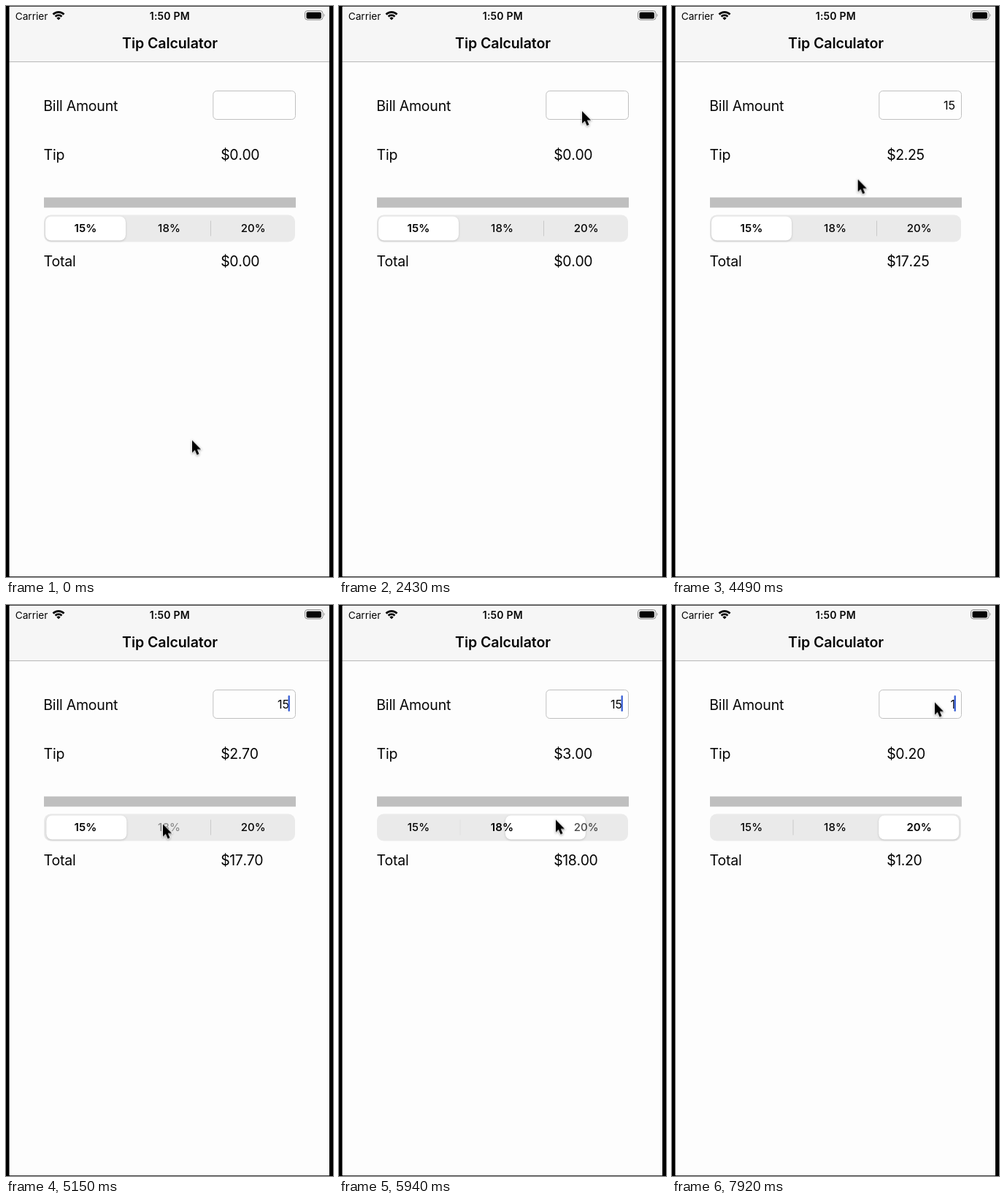
Write an HTML page that moves like this. It is 448x783 px and loops after 8000 ms.

```html
<!DOCTYPE html>
<html lang="en">
<head>
<meta charset="utf-8">
<title>Tip Calculator</title>
<style>
html, body { margin: 0; width: 100%; height: 100%; overflow: hidden; background: #fdfdfd; }
svg { display: block; width: 448px; height: 783px; }
text { font-family: Inter, "Open Sans", sans-serif; fill: #050505; }
.label { font-size: 19.5px; letter-spacing: -.2px; }
.money { font-size: 19.5px; letter-spacing: -.4px; font-kerning: none; }
.title { font-size: 19.6px; font-weight: 600; letter-spacing: -.1px; }
.status { font-size: 13.7px; }
.clock { font-size: 14px; font-weight: 600; letter-spacing: .2px; }
.field { font-size: 16.2px; text-anchor: end; }
.seg { font-size: 15px; font-weight: 500; letter-spacing: .1px; text-anchor: middle; }
.seg.on { font-weight: 600; }
.mid { text-anchor: middle; }
#thumb { filter: drop-shadow(0 1px 1.5px rgba(0, 0, 0, .17)); }
#cursor {
  filter: drop-shadow(0 1.5px 1.5px rgba(0, 0, 0, .35));
  animation: point 8s ease-in-out infinite;
}
@keyframes point {
  0%, 6.24% { transform: translate(255px, 595.5px); }
  6.25%, 11.2% { transform: translate(354.5px, 97px); }
  14.5%, 17% { transform: translate(353.5px, 55px); }
  19.75% { transform: translate(352px, 66.5px); }
  23.1% { transform: translate(334px, 142px); }
  38.2%, 54% { transform: translate(332px, 146.5px); }
  57.6% { transform: translate(214.5px, 285px); }
  61%, 69% { transform: translate(215px, 300.5px); }
  72.5%, 75.9% { transform: translate(297px, 294.5px); }
  81.25% { transform: translate(339px, 140.5px); }
  85.9%, 100% { transform: translate(360px, 133.5px); }
}
</style>
</head>
<body>
<svg viewBox="0 0 448 783">
  <rect width="448" height="783" fill="#fdfdfd"/>
  <rect width="448" height="76" fill="#f6f6f6"/>
  <rect y="76" width="448" height="1" fill="#b8b8b8"/>

  <text class="status" x="12.7" y="18.5">Carrier</text>
  <g fill="none" stroke="#050505" stroke-width="2.7">
    <path d="M64.5 11.5A10.6 10.6 0 0 1 79.5 11.5M67.55 14.55A6.3 6.3 0 0 1 76.45 14.55"/>
    <path d="M72 19.3l-2.6-2.6a3.6 3.6 0 0 1 5.2 0z" fill="#050505" stroke="none"/>
  </g>
  <text class="clock mid" x="224.3" y="18.5">1:50 PM</text>
  <rect x="409.5" y="6.5" width="24.5" height="12.5" rx="3.5" fill="none" stroke="#8c8c8c"/>
  <rect x="411.5" y="8.5" width="20.5" height="9" rx="2" fill="#050505"/>
  <path d="M435.5 10.5q2 2.2 0 4.4z" fill="#8c8c8c"/>
  <text class="title mid" x="224.5" y="57.5">Tip Calculator</text>

  <text class="label" x="51.3" y="144">Bill Amount</text>
  <text class="label" x="51.6" y="211">Tip</text>
  <text class="label" x="51.6" y="357">Total</text>
  <rect x="283.8" y="116.5" width="112.7" height="39" rx="5" fill="#fefefe" stroke="#c0c0c0"/>
  <text class="field" id="bill" x="388.2" y="141.5"></text>
  <rect id="caret" x="386.5" y="124" width="2.4" height="22" rx="1" fill="#3d62d6"/>
  <text class="money" id="tip" x="294.2" y="211"></text>
  <text class="money" id="total" x="294.2" y="357"></text>

  <rect x="52" y="262.5" width="345" height="14" fill="#bfbfbf"/>
  <rect x="52" y="286.5" width="344" height="37" rx="9" fill="#eaeaea"/>
  <rect class="sep" x="165.5" y="294.5" width="1" height="21" fill="#c9c9c9"/>
  <rect class="sep" x="280" y="294.5" width="1" height="21" fill="#c9c9c9"/>
  <rect id="thumb" y="288.5" width="110" height="33" rx="8" fill="#fff"/>
  <text class="seg" x="109" y="310.3">15%</text>
  <text class="seg" x="223.5" y="310.3">18%</text>
  <text class="seg" x="338.7" y="310.3">20%</text>

  <path d="M0 0H448V783H0ZM4.5 1V782H443V1Z" fill="#000" fill-rule="evenodd"/>
  <path d="M5 .5H443M5 782.5H443" stroke="#4a4a4a"/>
  <path id="cursor" d="M0 0V17L3.8 13.5 6.6 20 9.6 18.7 6.9 12.4H12.2Z"
    fill="#000" stroke="#fff" stroke-width="1.4" paint-order="stroke"/>
</svg>
<script>
const LOOP = 8000;
const FOCUS = 1920, BLINK = 980;          // caret appears, blink period
const TAPS = [5150, 5885], SLIDE = 260;   // 18% then 20%, thumb travel time
const RATES = [.15, .18, .2];
const KEYS = [[3740, '1'], [3980, '15'], [7520, '1'], [7640, ''], [7920, '1']];

const $ = id => document.getElementById(id);
const segs = document.querySelectorAll('.seg');
const seps = document.querySelectorAll('.sep');
const clamp = x => Math.min(1, Math.max(0, x));
const easeOut = x => 1 - (1 - clamp(x)) ** 3;
const money = n => '$' + n.toFixed(2);

function drawBill(t) {
  const [typedAt, bill] = KEYS.findLast(key => key[0] <= t) ?? [-LOOP, ''];
  const tip = bill * RATES[TAPS.filter(tap => tap <= t).length];
  $('bill').textContent = bill;
  $('tip').textContent = money(tip);
  $('total').textContent = money(+bill + tip);

  // The caret stays lit for a moment after each key
  const lit = t - typedAt < 400 || (t - FOCUS) % BLINK < BLINK / 2;
  $('caret').style.opacity = +(t >= FOCUS && lit);
}

function drawSegments(t) {
  const moves = TAPS.map(tap => easeOut((t - tap) / SLIDE));
  const pos = moves[0] + moves[1];
  $('thumb').setAttribute('x', 54 + 114.6 * pos);
  segs.forEach((seg, i) => seg.classList.toggle('on', i === Math.floor(pos + .1)));
  // A pressed label dims, then recovers as the thumb arrives
  TAPS.forEach((tap, i) => {
    segs[i + 1].style.opacity = t < tap - 120 ? 1 : .4 + .6 * moves[i];
  });
  seps[0].style.opacity = clamp(pos - 1) ** 2;
  seps[1].style.opacity = clamp(1 - pos) ** 2;
}

const start = performance.now();
function tick() {
  const t = (performance.now() - start) % LOOP;
  drawBill(t);
  drawSegments(t);
  requestAnimationFrame(tick);
}
tick();
</script>
</body>
</html>
```
